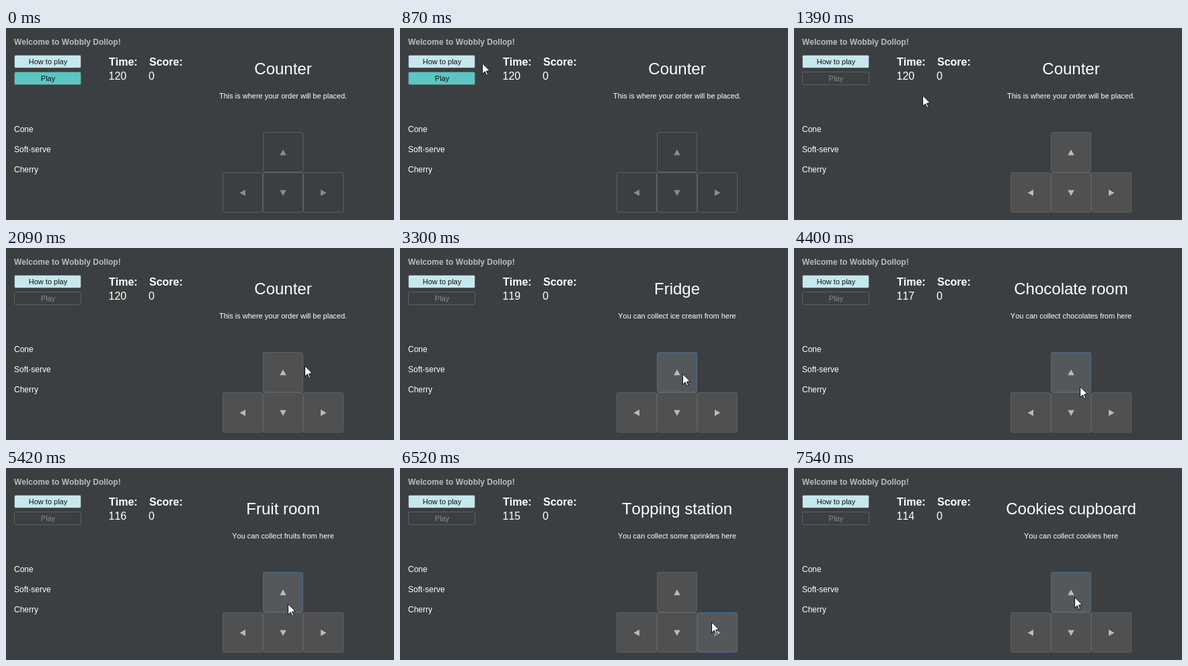
Recreate the animation shown at these times as an HTML page with a canvas. Size 577x286 px, loop 8000 ms.

```html
<!DOCTYPE html>
<html lang="en">
<head>
<meta charset="utf-8">
<title>Ice cream game</title>
<style>
  html, body { margin: 0; width: 100%; height: 100%; overflow: hidden; background: #3c3f41; }
  canvas { display: block; }
</style>
</head>
<body>
<canvas id="stage" width="577" height="286"></canvas>
<script>
const ctx = document.getElementById('stage').getContext('2d');
const LOOP = 8000;
const PLAY_AT = 1290;
const STEP = 100;        // the pointer is seen every 100 ms
const GLIDE_STEPS = 3;   // and takes three steps per move
const FONT = '"Liberation Sans", Arial, sans-serif';
const C = {
  page: '#3c3f41', border: '#5e6060', hoverBorder: '#466d94',
  button: '#4e5051', hover: '#55585a', text: '#bbbbbb', off: '#8c8c8c',
  help: '#c5e8ee', play: '#5cc6c3', playHover: '#67cac7'
};

// Each room opens at a click.
const rooms = [
  { at: 0, title: 'Counter', info: 'This is where your order will be placed.' },
  { at: 3300, title: 'Fridge', info: 'You can collect ice cream from here' },
  { at: 4100, title: 'Chocolate room', info: 'You can collect chocolates from here' },
  { at: 5220, title: 'Fruit room', info: 'You can collect fruits from here' },
  { at: 6120, title: 'Topping station', info: 'You can collect some sprinkles here' },
  { at: 7140, title: 'Cookies cupboard', info: 'You can collect cookies here' }
];

// Where the pointer rests, and when it gets there; it starts off stage.
const rests = [
  { at: 0, x: 818, y: 489 },
  { at: 470, x: 275, y: 95 },
  { at: 870, x: 122, y: 52 },
  { at: 1090, x: 80, y: 70 },
  { at: 1590, x: 280, y: 124 },
  { at: 2090, x: 444, y: 175 },
  { at: 2490, x: 420, y: 187 },
  { at: 3800, x: 464, y: 235 },
  { at: 4400, x: 425, y: 206 },
  { at: 4800, x: 419, y: 202 },
  { at: 6520, x: 463, y: 229 },
  { at: 7540, x: 417, y: 192 }
];

const clamp = u => Math.min(1, Math.max(0, u));
const easeOut = u => u * (2 - u);

function pointerAt(t) {
  return rests.reduce((p, rest) => {
    const u = easeOut(clamp(1 + Math.floor((t - rest.at) / STEP) / GLIDE_STEPS));
    return { x: p.x + (rest.x - p.x) * u, y: p.y + (rest.y - p.y) * u };
  }, rests[0]);
}

function text(str, x, y, size, color = '#fff', align = 'left', weight = '') {
  ctx.font = `${weight} ${size}px ${FONT}`;
  ctx.fontKerning = 'none';
  ctx.fillStyle = color;
  ctx.textAlign = align;
  ctx.fillText(str, x, y);
}

function box(x, y, w, h, fill, stroke) {
  ctx.beginPath();
  ctx.roundRect(x + 0.5, y + 0.5, w - 1, h - 1, 2);
  ctx.fillStyle = fill;
  ctx.fill();
  ctx.strokeStyle = stroke;
  ctx.lineWidth = 1;
  ctx.stroke();
}

function polygon(points, fill) {
  ctx.beginPath();
  points.forEach(([x, y]) => ctx.lineTo(x, y));
  ctx.closePath();
  ctx.fillStyle = fill;
  ctx.fill();
}

const isOver = (p, x, y, w, h) => p.x >= x && p.x < x + w && p.y >= y && p.y < y + h;

function drawArrow(col, row, turns, enabled, p) {
  const x = 322 + 60 * col, y = 155 + 60 * row;
  const hovered = enabled && isOver(p, x, y, 60, 60);
  const fill = !enabled ? C.page : hovered ? C.hover : C.button;
  box(x, y, 60, 60, fill, hovered ? C.hoverBorder : C.border);
  ctx.save();
  ctx.translate(x + 30, y + 30.5);
  ctx.rotate(turns * Math.PI / 2);
  polygon([[0, -4.5], [4.7, 4], [-4.7, 4]], enabled ? C.text : C.off);
  ctx.restore();
}

function drawPointer({ x, y }) {
  ctx.save();
  ctx.translate(Math.round(x), Math.round(y));
  polygon([[0.5, 0.8], [0.5, 16.5], [4.2, 12.8], [6.7, 18.5], [8.8, 17.8], [6.5, 12.2], [11.4, 11.5]], '#fff');
  ctx.strokeStyle = '#111';
  ctx.lineWidth = 1;
  ctx.stroke();
  ctx.restore();
}

function draw(t) {
  const p = pointerAt(t);
  const started = t >= PLAY_AT;
  const room = rooms.findLast(r => r.at <= t);
  const seconds = 120 - Math.max(0, Math.floor((t - PLAY_AT - 90) / 1005));

  ctx.fillStyle = C.page;
  ctx.fillRect(0, 0, 577, 286);

  text('Welcome to Wobbly Dollop!', 12, 25, 12, C.text, 'left', 'bold');
  box(12, 40, 100, 20, C.help, C.border);
  text('How to play', 62.5, 54, 11, '#111', 'center');

  const overPlay = !started && isOver(p, 12, 65, 100, 20);
  const playFill = started ? C.page : overPlay ? C.playHover : C.play;
  box(12, 65, 100, 20, playFill, overPlay ? C.hoverBorder : C.border);
  text('Play', 62.5, 79, 11, started ? C.off : '#111', 'center');

  text('Time:', 153, 56, 16, '#fff', 'left', 'bold');
  text('Score:', 213, 56, 16, '#fff', 'left', 'bold');
  text(seconds, 152.5, 77, 16);
  text('0', 212, 77, 16);

  ['Cone', 'Soft-serve', 'Cherry'].forEach((name, i) => text(name, 12, 155 + 30 * i, 12));

  text(room.title, 412, 69, 24, '#fff', 'center');
  text(room.info, 412, 105, 11, '#fff', 'center');

  drawArrow(1, 0, 0, started, p);
  for (let col = 0; col < 3; col++) drawArrow(col, 1, 3 - col, started, p);
  drawPointer(p);
}

const start = performance.now();
function tick() {
  draw((performance.now() - start) % LOOP);
  requestAnimationFrame(tick);
}
tick();
</script>
</body>
</html>
```
